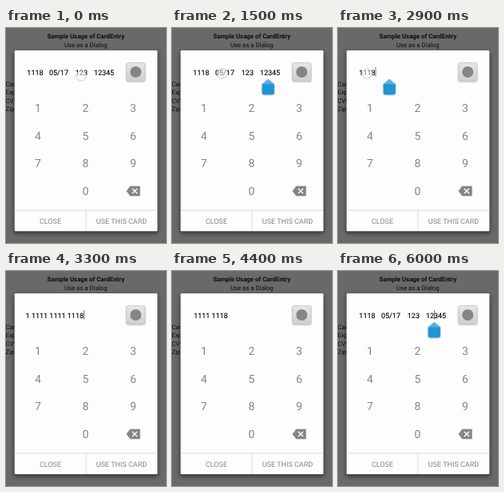
Recreate the animation shown at these times as an HTML page. Size 200 by 269 pixels, loop 6.1 s.

```html
<!DOCTYPE html>
<html lang="en">
<head>
<meta charset="utf-8">
<title>Card entry dialog</title>
<style>
html, body { margin: 0; width: 100%; height: 100%; overflow: hidden; background: #696969; }
svg { display: block; width: 100%; height: 100%; }
text { font-family: Roboto, sans-serif; text-rendering: geometricPrecision; white-space: pre; }
.page { font-size: 7.85px; fill: #0c0c0c; }
.field { font-size: 9px; fill: #000; stroke: #000; stroke-width: .12px; }
.key { font-size: 14px; fill: #858585; text-anchor: middle; }
.button { font-size: 9px; fill: #858585; text-anchor: middle; }
</style>
</head>
<body>
<svg viewBox="0 0 200 269" preserveAspectRatio="none">
  <defs>
    <linearGradient id="face" x1="0" y1="0" x2="0" y2="1">
      <stop offset="0" stop-color="#e6e6e6"/><stop offset="1" stop-color="#cfcfcf"/>
    </linearGradient>
    <linearGradient id="rear" x1="0" y1="0" x2="0" y2="1">
      <stop offset="0" stop-color="#b5b5b5"/><stop offset="1" stop-color="#8e8e8e"/>
    </linearGradient>
    <filter id="soft" x="-20%" y="-20%" width="140%" height="140%"><feGaussianBlur stdDeviation="2.5"/></filter>
    <filter id="tight" x="-30%" y="-30%" width="160%" height="160%"><feGaussianBlur stdDeviation=".8"/></filter>
    <clipPath id="window"><rect id="windowBox" x="25" y="46" width="23" height="18"/></clipPath>
  </defs>

  <rect width="200" height="269" fill="#696969"/>
  <g class="page">
    <text x="99.8" y="12.5" text-anchor="middle" font-weight="700">Sample Usage of CardEntry</text>
    <text x="99.8" y="23.5" text-anchor="middle">Use as a Dialog</text>
    <text x="-.5" y="73">Card</text>
    <text x="-.5" y="83.3">Exp</text>
    <text x="-.5" y="93.6">CVV</text>
    <text x="-.5" y="104">Zip</text>
  </g>

  <rect x="10" y="30" width="180" height="227" rx="3" fill="#000" opacity=".5" filter="url(#soft)"/>
  <rect x="10.7" y="28" width="178.6" height="226.3" rx="1.5" fill="#fdfdfd"/>
  <path d="M11 228H189M100 228V254" stroke="#dadada" fill="none"/>
  <text class="button" x="55.5" y="244.7">CLOSE</text>
  <text class="button" x="144.5" y="244.7">USE THIS CARD</text>
  <g id="keys"></g>
  <path d="M150.5 204L155.2 197.7H167.6V210.3H155.2Z" fill="#858585"/>
  <path d="M157.8 200.9L164 207.1M164 200.9L157.8 207.1" stroke="#fdfdfd" stroke-width="1.4"/>

  <g clip-path="url(#window)"><text id="number" class="field" y="58.5" text-anchor="end">5111 1111 1111 1118</text></g>
  <g id="others" class="field">
    <text x="54" y="58.5">05/17</text>
    <text x="86.8" y="58.5">123</text>
    <text x="109.9" y="58.5">12345</text>
  </g>
  <rect id="cursor" y="49" width=".8" height="11.5" fill="#555"/>

  <g id="card">
    <rect x="-11.7" y="-11" width="23.4" height="23.2" rx="2.5" fill="#000" opacity=".35" filter="url(#tight)"/>
    <g id="front">
      <rect x="-11.5" y="-11.5" width="23" height="23" rx="2.5" fill="url(#face)" stroke="#c4c4c4" stroke-width=".6"/>
      <circle r="7" fill="#858585"/>
    </g>
    <g id="back">
      <rect x="-11.5" y="-11.5" width="23" height="23" rx="2.5" fill="url(#rear)" stroke="#888" stroke-width=".6"/>
      <rect x="-11.5" y="-7" width="23" height="5.2" fill="#202020"/>
      <rect x="-9.5" y="1" width="18" height="4.2" fill="#f4f4f4"/>
      <path d="M-8 3.1H4M2.5 1.7L5 3.1L2.5 4.5" fill="none" stroke="#777" stroke-width=".7"/>
    </g>
  </g>

  <g id="handle">
    <path d="M0 1L7.5 7V17.5Q7.5 20 5 20H-5Q-7.5 20 -7.5 17.5V7Z" fill="#000" opacity=".35" filter="url(#tight)"/>
    <path d="M0 0L7.5 6.5V17Q7.5 19.5 5 19.5H-5Q-7.5 19.5 -7.5 17V6.5Z" fill="#54b2e2"/>
    <path d="M-7.5 6.5H7.5V17Q7.5 19.5 5 19.5H-5Q-7.5 19.5 -7.5 17Z" fill="#1f96d4"/>
  </g>
  <circle id="touch" r="6.2" fill="#f6f6fb" fill-opacity=".55" stroke="#c4c4d4" stroke-width=".9"/>
</svg>

<script>
const LOOP = 6100, STEP = 100;
const $ = id => document.getElementById(id);
const set = (id, attrs) => { for (const k in attrs) $(id).setAttribute(k, attrs[k]); };
const clamp = v => Math.max(0, Math.min(1, v));
const ramp = (t, a, b) => clamp((t - a) / (b - a));
const ease = p => (1 - Math.cos(Math.PI * p)) / 2;
const at = (list, t) => list.find(s => t >= s[0] && t < s[1]);

// [from, to, x, y]; each touch fades over its last 200 ms
const touches = [
  [0, 500, 94, 60], [800, 1200, 122.5, 59], [1500, 1900, 63, 57],
  [2700, 3200, 36.5, 57], [3900, 4400, 157.5, 135.5], [5600, 6000, 122, 59]
];
// [from, to, x]
const handles = [[300, 1000, 92], [1000, 1700, 120.2], [1700, 3000, 64.3], [5800, LOOP, 120.3]];
const cursors = [
  [300, 700, 92], [1000, 1400, 120], [1700, 2200, 64.3],
  [4600, 5700, 77.8], [5700, LOOP, 120]
];

function addKeys() {
  for (let i = 0; i < 10; i++) {
    const key = document.createElementNS("http://www.w3.org/2000/svg", "text");
    const col = i === 9 ? 1 : i % 3;
    key.setAttribute("class", "key");
    key.setAttribute("x", 40 + col * 59.5);
    key.setAttribute("y", 105 + Math.floor(i / 3) * 34.7);
    key.textContent = (i + 1) % 10;
    $("keys").append(key);
  }
}

function draw(now) {
  const t = Math.floor((now % LOOP) / STEP) * STEP;

  // the number field widens to the right and uncovers its leading digits
  const grow = ease(ramp(t, 2900, 3500)) - ease(ramp(t, 4100, 4600));
  const right = 46.6 + 67.3 * grow;
  set("number", { x: right });
  set("windowBox", { width: right - 24.5 });
  set("others", { opacity: 1 - ramp(t, 2600, 2900) + ramp(t, 4400, 4900) });

  const typing = t >= 2800 && t < 4400;
  const cursor = typing ? [0, 0, right] : at(cursors, t);
  set("cursor", { x: cursor ? cursor[2] : 0, opacity: cursor ? 1 : 0 });

  const turn = ease(ramp(t, 200, 800)) - ease(ramp(t, 900, 1500));
  const side = Math.cos(turn * Math.PI);
  set("card", { transform: `translate(162.2 55) scale(${Math.max(0.03, Math.abs(side))} 1)` });
  set("front", { opacity: side >= 0 ? 1 : 0 });
  set("back", { opacity: side < 0 ? 1 : 0 });

  const handle = at(handles, t);
  set("handle", { opacity: handle ? 1 : 0, transform: `translate(${handle ? handle[2] : 0} 63.7)` });

  const touch = at(touches, t);
  set("touch", touch
    ? { cx: touch[2], cy: touch[3], opacity: clamp((touch[1] - t) / 200) }
    : { opacity: 0 });
}

addKeys();
const start = performance.now();
function tick() {
  draw(performance.now() - start);
  requestAnimationFrame(tick);
}
tick();
</script>
</body>
</html>
```
